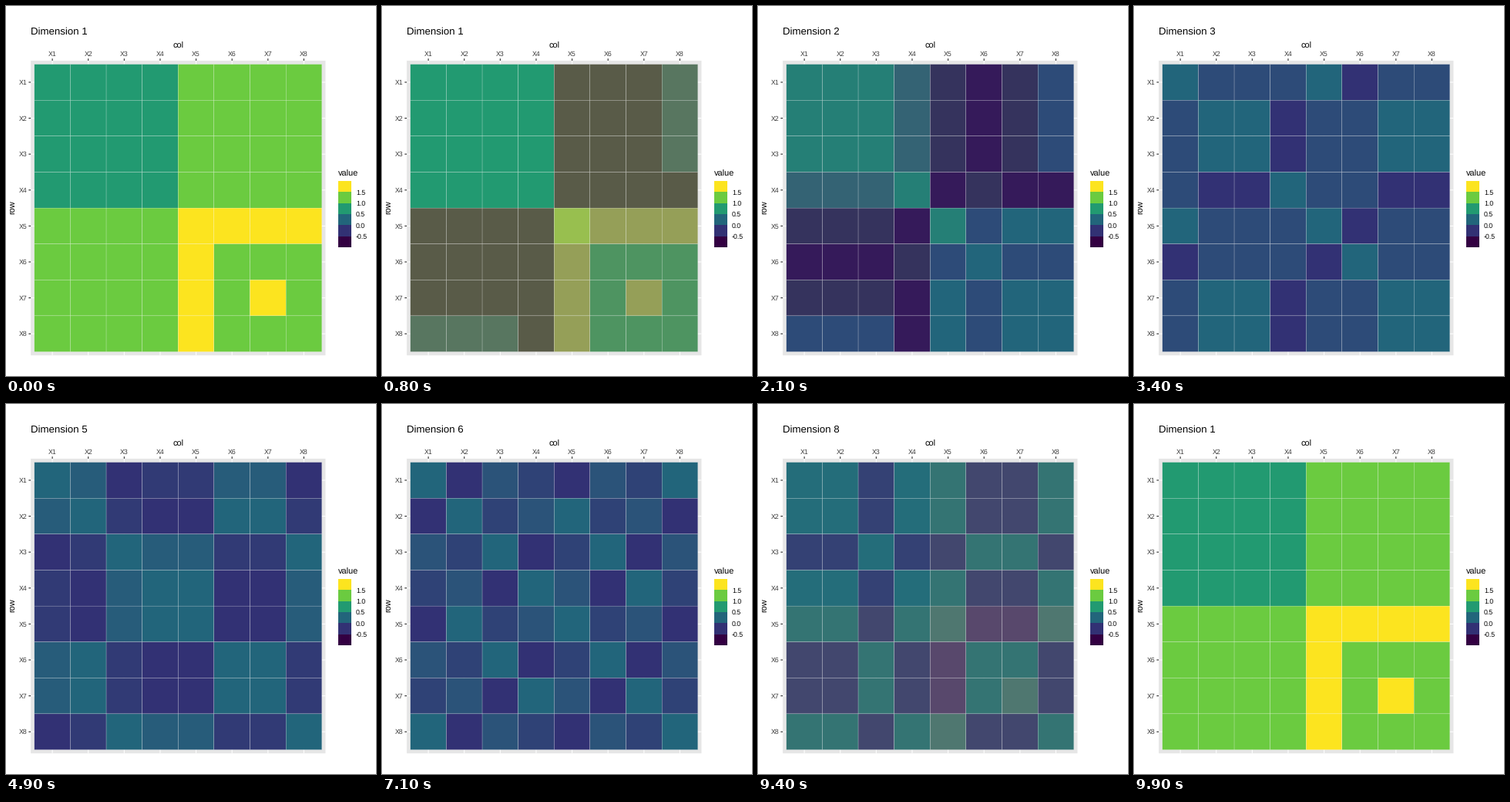
A matplotlib script that plays this animation: 480 by 480 pixels, repeating every 10 s.

```python
import numpy as np
import matplotlib.pyplot as plt
from matplotlib.animation import FuncAnimation
from matplotlib.collections import PatchCollection
from matplotlib.colors import to_rgb
from matplotlib.patches import Rectangle

SIZE, DPI = 480, 72
FRAMES, INTERVAL = 100, 100
STEPS = 6                                  # frames per transition
STARTS = [6 + 12 * i + min(i, 4) for i in range(8)]

plt.rcParams.update({
    "font.family": "Liberation Sans",
    "text.hinting": "none",
})

# ---------- colour ----------
XYZ65 = np.array([[.4124, .3576, .1805], [.2126, .7152, .0722], [.0193, .1192, .9505]])
WHITE = XYZ65.sum(axis=1)
SRGB50 = np.array([[.43607, .38515, .14307], [.22249, .71687, .06061], [.01392, .09708, .71410]])
SOFT50 = np.array([[.45427, .35332, .15662], [.24263, .67441, .08336], [.01482, .09042, .71953]])
TO_SOFT = np.linalg.inv(SOFT50) @ SRGB50


def linear(rgb):
    rgb = np.asarray(rgb, float)
    return np.where(rgb > .04045, ((rgb + .055) / 1.055) ** 2.4, rgb / 12.92)


def to_lab(rgb):
    q = linear(rgb) @ XYZ65.T / WHITE
    f = np.where(q > .008856, np.cbrt(q), 7.787 * q + 16 / 116)
    x, y, z = np.moveaxis(f, -1, 0)
    return np.stack([116 * y - 16, 500 * (x - y), 200 * (y - z)], axis=-1)


def screen(lin):
    """Linear sRGB to the gamma 1.8 display space."""
    return np.clip(lin @ TO_SOFT.T, 0, 1) ** (1 / 1.8)


def from_lab(lab):
    L, a, b = np.moveaxis(lab, -1, 0)
    y = (L + 16) / 116
    f = np.stack([y + a / 500, y, y - b / 200], axis=-1)
    q = np.where(f > .2069, f ** 3, (f - 16 / 116) / 7.787)
    return screen((q * WHITE) @ np.linalg.inv(XYZ65).T)


def shade(c):
    return screen(linear(to_rgb(c)))


VIRIDIS = [to_rgb(c) for c in
           ("#440154", "#414487", "#2A788E", "#22A884", "#7AD151", "#FDE725")]
LAB = to_lab(VIRIDIS)
CUTS = [-.5, 0, .5, 1, 1.5]


# ---------- data: one rank-one matrix per dimension ----------
def signs(s):
    return [.5 if c == "+" else -.5 for c in s]


VECTORS = [
    [.95, .95, .95, .95, 1.3, 1.2, 1.23, 1.2],
    [.75, .75, .75, .8, -.72, -.68, -.68, -.65],
    signs("+++-+-++"),
    signs("+--++---"),
    signs("++---++-"),
    signs("+-+--+-+"),
    signs("+--+--++"),
    signs("++-++--+"),
]
LABS = [LAB[np.digitize(np.outer(v, v), CUTS)] for v in VECTORS]


def state(frame):
    """Cell colours and dimension number for one frame."""
    i = sum(frame >= s for s in STARTS) - 1
    k = min(frame - STARTS[i] + 1, STEPS) if i >= 0 else STEPS
    weak = 2 <= i <= 6
    if weak and k == 1:                    # faint changes start late
        i, k = i - 1, STEPS
        weak = i >= 2
    a, b = i % 8, (i + 1) % 8
    t = (min(k, 5) if weak else k) / STEPS  # and stop short
    cells = from_lab(LABS[a] + (LABS[b] - LABS[a]) * t)
    return cells.reshape(-1, 3), (b if k > STEPS / 2 else a) + 1


# ---------- stage ----------
X0, Y0, CELL = 36.8, 75.6, 46.62
PAD = CELL / 10
xs = X0 + CELL * np.arange(9)
ys = Y0 + CELL * np.arange(9)
L, R = xs[0] - PAD, xs[-1] + PAD
T, B = ys[0] - PAD, ys[-1] + PAD
GREY, TICK, LABEL = (shade(c) for c in ("#EBEBEB", "#333333", "#4D4D4D"))

fig = plt.figure(figsize=(SIZE / DPI, SIZE / DPI), dpi=DPI, facecolor="white")
ax = fig.add_axes([0, 0, 1, 1])
ax.set_xlim(0, SIZE)
ax.set_ylim(SIZE, 0)
ax.set_autoscale_on(False)
ax.axis("off")


def box(x, y, w, h, color, **kw):
    ax.add_patch(Rectangle((x, y), w, h, fc=color, lw=0, zorder=1, **kw))


def text(x, y, s, size, color="black", **kw):
    return ax.text(x, y, s, fontsize=size, color=color, va="baseline", **kw)


def line(x, y, color):
    ax.plot(x, y, color=color, lw=1.07, zorder=2, solid_capstyle="butt", snap=False)


box(L, T, R - L, B - T, GREY, snap=False)
for n in range(8):
    cx, cy = xs[n] + CELL / 2, ys[n] + CELL / 2
    line([cx, cx], [T, B], "white")
    line([L, R], [cy, cy], "white")
    line([cx, cx], [T - 2.75, T], TICK)
    line([L - 2.75, L], [cy, cy], TICK)
    text(cx, 65, f"X{n + 1}", 8.8, LABEL, ha="center")
    text(27.2, cy + 3.1, f"X{n + 1}", 8.8, LABEL, ha="right")

# thin white outlines with unsnapped edges leave soft seams between the tiles
tiles = PatchCollection([Rectangle((x, y), CELL, CELL) for y in ys[:-1] for x in xs[:-1]],
                        edgecolor="white", linewidth=.21, antialiased=True,
                        snap=False, zorder=3)
ax.add_collection(tiles, autolim=False)

title = text(32, 37.2, "Dimension 1", 13.2)
text(223.2, 55, "col", 11, ha="center")
text(12, 261.5, "row", 11, ha="center", rotation=90, rotation_mode="anchor")

text(431, 220.6, "value", 11)
for n, c in enumerate(reversed(VIRIDIS)):
    box(431, 226.8 + 14.4 * n, 17.3, 14.4, shade(c))
for n, v in enumerate(reversed(CUTS)):
    text(454, 244.6 + 14.4 * n, f"{v:.1f}", 8.8)


def draw(frame):
    cells, dim = state(frame)
    tiles.set_facecolor(cells)
    title.set_text(f"Dimension {dim}")
    return tiles, title


anim = FuncAnimation(fig, draw, frames=FRAMES, interval=INTERVAL,
                     init_func=lambda: draw(0), repeat=True, repeat_delay=0)
plt.show()
```
